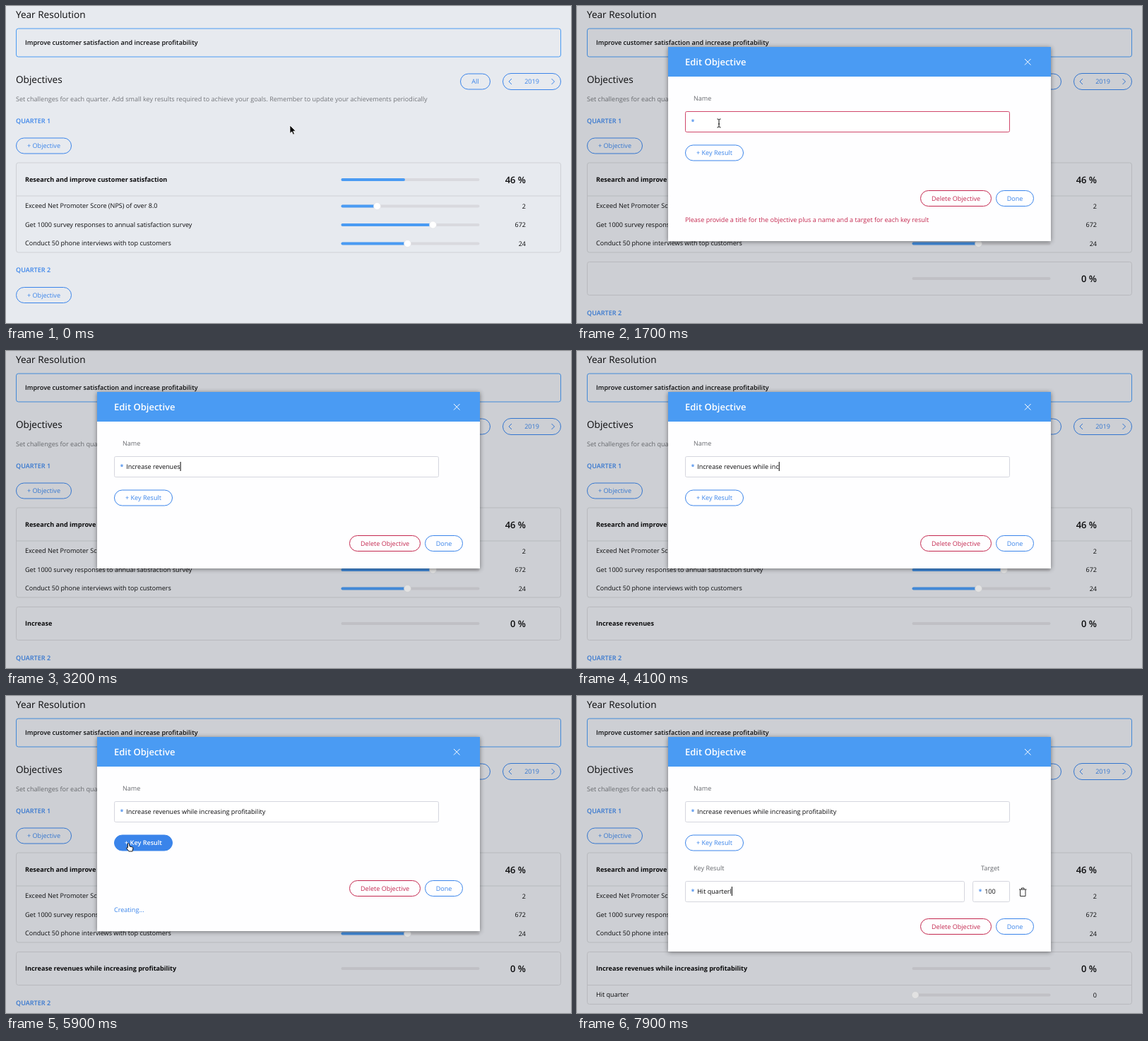
Recreate the animation shown at these times as an HTML page. Size 800 by 449 pixels, loop 8 s.

```html
<!DOCTYPE html>
<html lang="en">
<head>
<meta charset="utf-8">
<title>Objectives</title>
<style>
  html, body { margin: 0; width: 100%; height: 100%; overflow: hidden; background: #e7eaef; }
  svg { display: block; width: 800px; height: 449px; }
  text {
    font: 9.07px "Open Sans", sans-serif;
    text-rendering: geometricPrecision;
    white-space: pre;
  }
  .modal { filter: drop-shadow(0 1px 3px rgba(0, 0, 0, .45)); }
</style>
</head>
<body>
<svg id="stage" viewBox="0 0 800 449"></svg>
<script>
const LOOP = 8000, STEP = 100;
const BLUE = '#3a84ea', SKY = '#4a9bf3', RED = '#c4284f', INK = '#0c0c0e', GREY = '#73757a';
const GOAL = 'Increase revenues while increasing profitability';
const RESULT = 'Hit quarterly';
const ERROR = 'Please provide a title for the objective plus a name and a target for each key result';
const stage = document.getElementById('stage');

// Key tables: [time, value, ...]
const GOAL_TYPING = [[1800, 0], [3200, 17], [4100, 27], [4500, 32], [4600, 32], [5500, 48]];
const RESULT_TYPING = [[6600, 0], [6900, 3], [7200, 3], [7900, 12]];
const POINTER = [[0, 402, 169], [100, 385, 170], [300, 190, 186], [500, 58, 197], [900, 58, 197],
  [1000, 80, 192], [1300, 201, 166], [5500, 201, 166], [5700, 174, 209], [6200, 174, 209],
  [6300, 178, 220], [6500, 201, 277]];
const STATUS = [[0, ''], [700, 'Creating...'], [1500, ERROR], [1900, ''], [2500, 'Saving...'],
  [2900, ''], [3400, 'Saving...'], [3700, ''], [5500, 'Saving...'], [5700, ''],
  [5800, 'Creating...'], [6200, ERROR], [6700, ''], [7200, 'Saving...'], [7500, '']];
const SAVED_GOAL = [[0, 0], [2500, 8], [3400, 17], [5500, 48]];
const SAVED_RESULT = [[0, 0], [7200, 3], [7800, 11]];

const clamp = v => Math.max(0, Math.min(1, v));

function held(keys, t) {
  return keys.filter(k => k[0] <= t).pop()[1];
}

function lerp(keys, t, i = 1) {
  const n = keys.findIndex(k => k[0] > t);
  if (n === 0) return keys[0][i];
  if (n < 0) return keys[keys.length - 1][i];
  const a = keys[n - 1], b = keys[n];
  return a[i] + (b[i] - a[i]) * (t - a[0]) / (b[0] - a[0]);
}

// y is the middle of the capital letters
function text(x, y, str, { fill = INK, size = 9.07, weight = 400, anchor = 'start', id = '' } = {}) {
  return `<text x="${x}" y="${y + size * .357}" fill="${fill}" text-anchor="${anchor}"` +
    ` style="font-size:${size}px;font-weight:${weight}"${id && ` id="${id}"`}>${str}</text>`;
}

function rect(x, y, w, h, fill, stroke = 'none', r = 0) {
  return `<rect x="${x}" y="${y}" width="${w}" height="${h}" rx="${r}" fill="${fill}" stroke="${stroke}"/>`;
}

function path(d, stroke, extra = 'fill="none"') {
  return `<path d="${d}" stroke="${stroke}" ${extra}/>`;
}

function pill(x, y, w, label, { color = BLUE, hot = false, h = 22 } = {}) {
  return rect(x, y, w, h, hot ? BLUE : 'none', color, h / 2) +
    text(x + w / 2, y + h / 2, label, { fill: hot ? '#fff' : color, weight: hot ? 600 : 400, anchor: 'middle' });
}

function slider(y, end, knob) {
  return rect(474.5, y - 2, 196, 4, '#d9d9de', 'none', 2) +
    (end > 480 ? rect(474.5, y - 2, end - 474.5, 4, SKY, 'none', 2) : '') +
    (knob ? `<circle cx="${end}" cy="${y}" r="5" fill="#fff" stroke="#dfe1e6" stroke-width=".6"/>` : '');
}

function row(y, label, value, end) {
  return text(27, y, label) + slider(y + .5, end, true) + text(736, y + .5, value, { anchor: 'end' });
}

function head(y, label, value, end) {
  return text(27, y, label, { weight: 700 }) + slider(y, end) +
    text(736, y, value, { size: 12.96, weight: 600, anchor: 'end' });
}

function card(y, h, split) {
  return rect(14.5, y, 771, h, 'none', '#cfd1d6', 3) +
    (split ? path(`M15 ${split}H785`, '#cfd1d6') : '');
}

function page(t) {
  const added = t >= 1500, expanded = t >= 6200;
  const shift = expanded ? 88 : added ? 61 : 0;
  const quarter = { fill: BLUE, weight: 600 };
  let s = text(14, 12, 'Year Resolution', { size: 13.6 }) +
    rect(14.5, 32, 771, 40, 'none', SKY, 3) +
    text(27, 52, 'Improve customer satisfaction and increase profitability', { weight: 600 }) +
    text(14, 104.5, 'Objectives', { size: 13.6 }) +
    text(14, 132, 'Set challenges for each quarter. Add small key results required to achieve your goals. ' +
      'Remember to update your achievements periodically', { fill: GREY }) +
    pill(643.5, 96, 42, 'All') + pill(703.5, 95.5, 82, '2019', { h: 23 }) +
    path('M716 103l-4 4 4 4M772.5 103l4 4-4 4', BLUE) +
    text(14, 162.5, 'QUARTER 1', quarter) +
    pill(14.5, 187, 78, '+ Objective', { hot: t >= 500 && t < 900 }) +
    card(222, 127, 269) +
    head(246, 'Research and improve customer satisfaction', '46 %', 565) +
    row(283, 'Exceed Net Promoter Score (NPS) of over 8.0', '2', 525.5) +
    row(309.5, 'Get 1000 survey responses to annual satisfaction survey', '672', 604.5) +
    row(336, 'Conduct 50 phone interviews with top customers', '24', 568.5) +
    text(14, 374 + shift, 'QUARTER 2', quarter) +
    pill(14.5, 398.5 + shift, 78, '+ Objective');
  if (added) {
    s += card(362.5, expanded ? 74 : 47, expanded && 409.5) +
      head(386, GOAL.slice(0, held(SAVED_GOAL, t)), '0 %', 0);
  }
  if (expanded) s += row(423, RESULT.slice(0, held(SAVED_RESULT, t)), '0', 479);
  return s;
}

function field(x, y, w, value, { bad = false, id = '' } = {}) {
  return rect(x, y, w, 29, '#fff', bad ? '#d0476a' : '#d5d6de', 2) +
    text(x + 8, y + 14.5, '*', { fill: BLUE, weight: 600 }) +
    text(x + 16.7, y + 14.5, value, { id });
}

function modal(t) {
  const keyed = t >= 6200, status = held(STATUS, t), bad = status === ERROR;
  const drop = keyed ? 54 : 0, bottom = 308 + drop + (status ? 25 : 0);
  const goal = GOAL.slice(0, Math.floor(lerp(GOAL_TYPING, t)));
  const result = RESULT.slice(0, Math.floor(lerp(RESULT_TYPING, t)));
  const label = { fill: '#66686d' };
  let s = `<g class="modal">${rect(129, 58, 542, bottom - 58, '#fefeff')}</g>` +
    rect(129, 58, 542, 42, SKY) +
    text(153, 79.5, 'Edit Objective', { fill: '#fff', size: 13, weight: 600 }) +
    path('M634 75l8.5 8.5M642.5 75l-8.5 8.5', '#fff') +
    text(165, 131, 'Name', label) +
    field(153.5, 149.5, 459, goal, { bad: bad && !keyed, id: keyed ? '' : 'live' }) +
    pill(153.5, 197, 82, '+ Key Result', { hot: t >= 5700 && t < 6300 }) +
    pill(486.5, 261.5 + drop, 100, 'Delete Objective', { color: RED }) +
    pill(593.5, 261.5 + drop, 53, 'Done') +
    text(153, 302.5 + drop, status, { fill: bad ? RED : BLUE });
  if (keyed) {
    s += text(165, 244, 'Key Result', label) + text(572, 244, 'Target', label) +
      field(153.5, 262.5, 395, result, { bad, id: 'live' }) +
      field(560.5, 262.5, 52, '100') +
      path('M626 274h10.500M629.500 274v-2h3.500v2M627.500 274v9.500h7.500v-9.500', '#333');
  }
  const caret = (t >= 1800 && t < 5600) || (t >= 6600 && t < 7000) || t > 7200;
  if (caret) s += rect(0, keyed ? 270 : 157, 1, 13, '#000').replace('<rect', '<rect id="caret"');
  return s;
}

const SHAPES = {
  arrow: path('M0 0v11.500l2.700-2.500 1.800 4.200 2-.9-1.800-4.100h3.600z', '#fff', 'fill="#000" stroke-width=".8"'),
  beam: path('M-2.500-6q2 0 2.500 1.200q.5-1.200 2.500-1.200M0-5v10M-2.500 6q2 0 2.500-1.200q.5 1.200 2.500 1.200M-1 1h2', '#111'),
  hand: path('M-1.500 0q1.300-1 2 .4l.6 3.600 4 1q1 .4.800 2l-.9 4h-5l-3.500-4.500q.2-1.500 1.800-.5z', '#000',
    'fill="#fff" stroke-width=".9"')
};

function pointer(t) {
  if ((t >= 1900 && t < 5600) || t >= 6700) return '';
  const over = (t >= 500 && t < 900) || (t >= 5700 && t < 6300);
  const typing = (t >= 1200 && t < 5600) || t >= 6400;
  return `<g transform="translate(${lerp(POINTER, t)} ${lerp(POINTER, t, 2)})">` +
    SHAPES[over ? 'hand' : typing ? 'beam' : 'arrow'] + '</g>';
}

function draw(t) {
  const open = clamp((t - 600) / 300);
  stage.innerHTML = page(t) +
    (open ? `<g opacity="${open}">${rect(0, 0, 800, 449, 'rgba(0,0,0,.115)')}${modal(t)}</g>` : '') +
    pointer(t);
  const caret = document.getElementById('caret');
  if (caret) caret.setAttribute('x', 170.2 + document.getElementById('live').getComputedTextLength());
}

const start = performance.now();
let last = -1;
function tick(now) {
  const t = Math.floor(Math.max(0, now - start) % LOOP / STEP) * STEP;
  if (t !== last) draw(last = t);
  requestAnimationFrame(tick);
}
draw(0);
requestAnimationFrame(tick);
</script>
</body>
</html>
```
